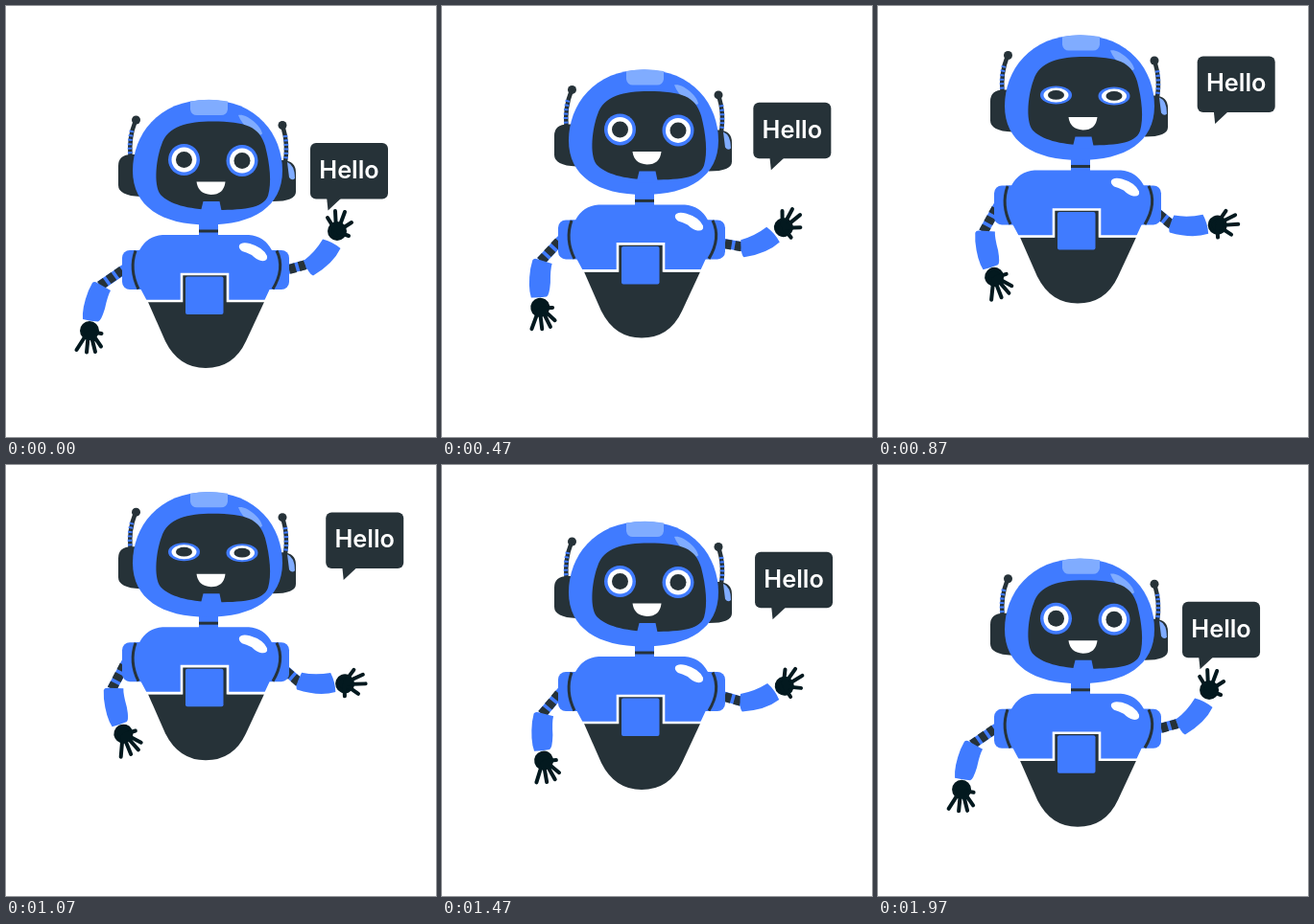
Animation, 448 px wide and 450 px high, one loop 2010 ms. Source, as an HTML page:

```html
<!DOCTYPE html>
<html lang="en">
<head>
<meta charset="utf-8">
<title>Waving robot</title>
<style>
  html, body { margin: 0; width: 100%; height: 100%; overflow: hidden; background: #fff }
  svg { display: block }
  .blue { fill: #407bff }
  .dark { fill: #263238 }
  .light { fill: #80acff }
  .white { fill: #fff }
  .line { fill: none; stroke: #263238; stroke-width: 3 }
  .tube { fill: none; stroke: #407bff; stroke-width: 10 }
  .rings { fill: none; stroke: #263238; stroke-width: 10; stroke-dasharray: 7 3.5 }
  .stem { fill: none; stroke: #263238; stroke-width: 4.5 }
  .bands { fill: none; stroke: #407bff; stroke-width: 4.5; stroke-dasharray: 2 2.5 }
  .hand { fill: #03191f; stroke: #03191f; stroke-width: 4; stroke-linecap: round }
  text { font: 600 25.3px Inter, "Open Sans", sans-serif; fill: #fff; text-anchor: middle }
</style>
</head>
<body>
<svg width="448" height="450" viewBox="0 0 448 450">
  <g id="robot">
    <g id="armL">
      <path class="tube" d="M126 273L98 292"/>
      <path class="rings" d="M121 276L98 292"/>
      <path class="blue" d="M90 289Q92 287 95 289L109 297Q106 302 103 316Q99 329 96 329.500Q88 329 80 327Q79 315 86 297Z"/>
      <g class="hand">
        <circle cx="87" cy="339" r="8"/>
        <path d="M85 341L73.500 359M86 341L84 361.500M88 341L93 361M89 341L99 355.500M88 340L99.500 342"/>
      </g>
    </g>
    <g id="armR">
      <path class="tube" d="M290 276L316 269"/>
      <path class="rings" d="M295 275L316 269"/>
      <g id="lowR">
        <path id="foreR" class="blue" d="M330 243.500Q340 246 348.500 253Q341 269 320 281.500Q316 281 310 266Q322 257 330 243.500Z"/>
        <g id="handR" class="hand">
          <circle cx="345" cy="235" r="8"/>
          <path d="M343 234L335 221M344 234L343 214M346 234L353 215M346 235L360 226M346 236L357 240"/>
        </g>
      </g>
    </g>

    <rect class="blue" x="121" y="255" width="30" height="41" rx="8"/>
    <rect class="blue" x="265" y="255" width="30" height="41" rx="8"/>
    <rect class="blue" x="201" y="222" width="20" height="20"/>
    <rect class="dark" x="201" y="233.500" width="20" height="3"/>
    <path class="blue" d="M163 239H253Q269 240 277 255H283Q290 274 276 293L269 308H147L139 293Q130 273 134 255H139Q147 240 163 239Z"/>
    <path class="line" d="M135 255.500Q128 275 138 295.500M282 255.500Q291 274 278 295.500"/>
    <path class="dark" d="M148 309H269L250 350Q237 378 208 378Q180 378 166 350Z"/>
    <path class="dark" d="M184 280H231V310H184Z"/>
    <path d="M146 308H183V280H231V308H271" fill="none" stroke="#fff" stroke-width="2.600"/>
    <rect class="blue" x="187" y="282.500" width="39.500" height="39.500" rx="2"/>
    <path class="white" d="M243 250Q245 246 254 248Q268 252 272 261Q273 267 266 266Q261 265 256 260Q250 257 246 256Q242 253 243 250Z"/>

    <path class="stem" d="M134.500 121Q128 137 129.500 157M288.500 126Q294 144 291 163"/>
    <path class="bands" d="M131 130Q128 142 129.500 157M291 135Q293 148 291 163"/>
    <circle class="dark" cx="135.500" cy="119" r="4.500"/>
    <circle class="dark" cx="288" cy="124.500" r="4.500"/>
    <path class="dark" d="M140 155H131Q117 155 117 167V187Q117 198 140 199ZM280 161H289Q302 162 302 174V194Q302 204 278 204Z"/>
    <path class="light" d="M293 163Q301 166 301 180Q298 183 295 179Z"/>
    <path class="blue" d="M210 98C262 98 288 135 288 172C288 209 258 228.500 210 228.500C162 228.500 132 209 132 172C132 135 158 98 210 98Z"/>
    <path class="light" d="M192 99.500Q211 96 231 99.500V108Q230 114 224 114H199Q193 114 192 108ZM242 114C250 112 265 124 267 133C266 138 248 130 242 114Z"/>
    <path class="dark" d="M215 120.500C250 120.500 264 126 270 146C275 165 277 185 273 198C268 212 245 213 215 213C190 212 170 207 161 197C153 186 157 158 162 145C168 125 190 120.500 215 120.500Z"/>
    <path class="blue" d="M205.500 204H222.500L225 216H202.500Z"/>
    <path class="white" d="M198.500 183.500H228.500Q227 197 213.500 197Q200 196 198.500 183.500Z"/>
    <g class="eye">
      <circle class="blue" r="16.500"/><circle class="white" r="13"/><circle class="dark" r="8.500"/>
    </g>
    <g class="eye">
      <circle class="blue" r="16.500"/><circle class="white" r="13"/><circle class="dark" r="8.500"/>
    </g>
  </g>
  <g id="bubble">
    <path class="dark" d="M334 199L335.500 213.500L351 199Z"/>
    <rect class="dark" x="317" y="143" width="81" height="58.500" rx="6"/>
    <text x="357.500" y="180">Hello</text>
  </g>
</svg>
<script>
  const LOOP = 2010, FPS = 30, STEPS = 60;
  const eyes = document.querySelectorAll('.eye');
  const eyeSpots = ['185.5 160.5', '246 161.5'];
  const move = (id, value) => document.getElementById(id).setAttribute('transform', value);

  function pose(ms) {
    // The motion advances in 30 fps steps.
    const step = Math.min(STEPS - 1, Math.floor((ms + 4) * FPS / 1000));
    const rise = (1 - Math.cos(2 * Math.PI * step / STEPS)) / 2;
    const turn = (id, degrees, x, y) => move(id, `rotate(${degrees * rise} ${x} ${y})`);

    move('robot', `translate(0 ${-70.6 * rise})`);
    move('bubble', `translate(${16.4 * rise} ${-94.6 * rise})`);
    turn('armL', -28, 128, 273);
    turn('armR', 57, 284, 277);
    turn('lowR', -8, 315, 270);
    move('foreR', `translate(${-3.5 * rise} ${-5 * rise})`);
    turn('handR', 20, 345, 235);

    const open = 1 - .85 * Math.max(0, 1 - Math.abs(step - 29) / 6);
    eyes.forEach((eye, i) => eye.setAttribute('transform', `translate(${eyeSpots[i]}) scale(1 ${open})`));
  }

  const start = performance.now();
  function tick() {
    pose((performance.now() - start) % LOOP);
    requestAnimationFrame(tick);
  }
  tick();
</script>
</body>
</html>
```
